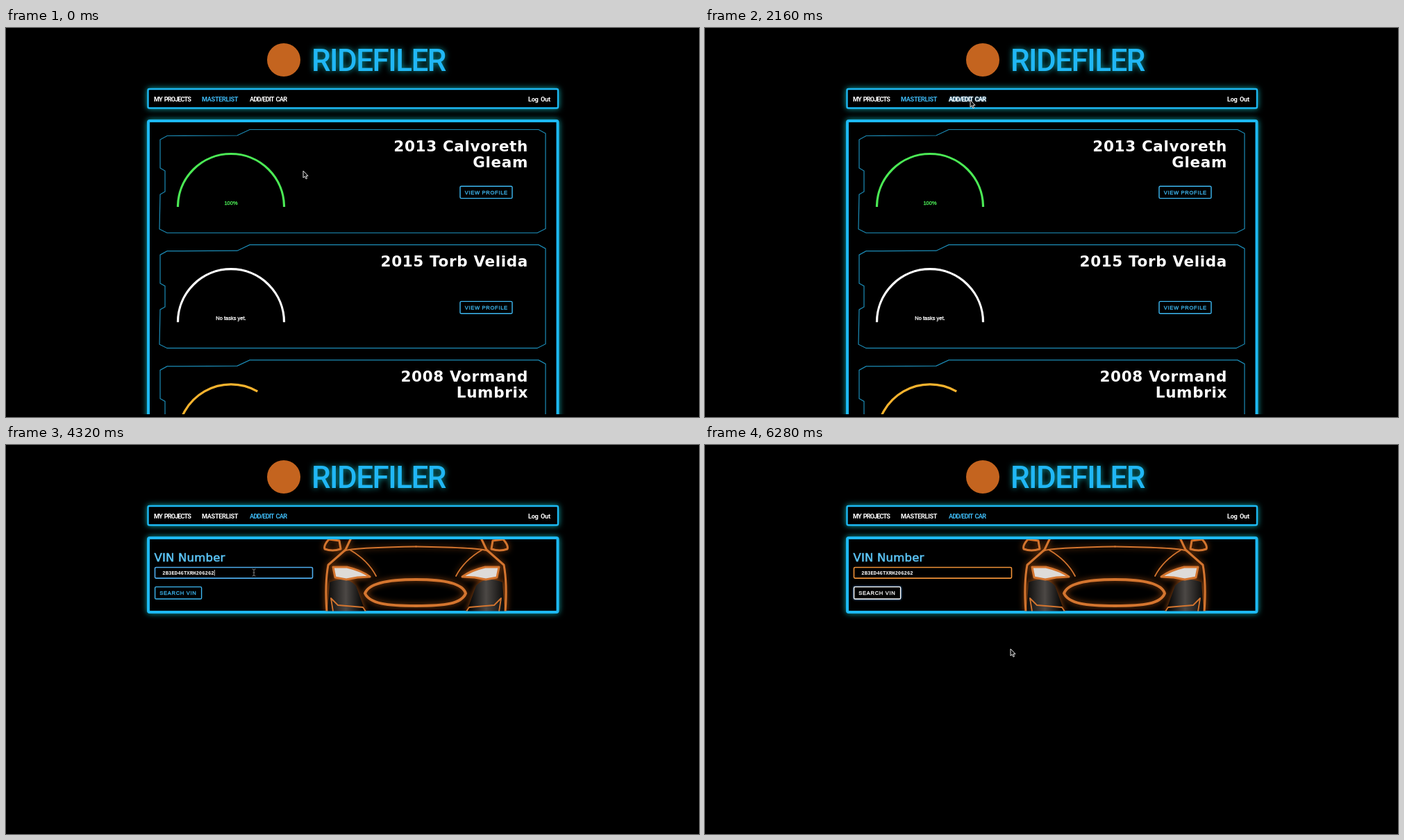
An HTML page for the animation above (8000 ms loop, 998 px wide and 561 px high).

```html
<!DOCTYPE html>
<html lang="en">
<head>
<meta charset="utf-8">
<title>Garage tracker</title>
<style>
html, body { margin: 0; width: 100%; height: 100%; overflow: hidden; background: #000; }
svg { display: block; width: 998px; height: 561px; }
text { white-space: pre; }
.brand { font: 500 44px Roboto, sans-serif; letter-spacing: -1.5px; fill: #20b7f5; filter: drop-shadow(0 0 4px #0c9aa0); }
.nav { font: 700 9.2px Roboto, sans-serif; word-spacing: 1.8px; fill: #fff; }
.title { font: 700 21.5px "DejaVu Sans", sans-serif; letter-spacing: .65px; fill: #fff; text-anchor: end; }
.label { font: 16.5px "DejaVu Sans", sans-serif; letter-spacing: .2px; fill: #5bc4f5; stroke: #5bc4f5; stroke-width: .6; }
.btn { font: 7.6px "Liberation Sans", Arial, sans-serif; letter-spacing: .68px; stroke-width: .3; }
.small { font: 7.5px "Liberation Sans", Arial, sans-serif; text-anchor: middle; stroke-width: .3; }
.vin { font: 700 7.3px "Liberation Mono", monospace; fill: #fff; }
.frame { fill: #000; stroke: #1db9f4; filter: drop-shadow(0 0 4.5px #0fa3a6); }
.line { fill: none; stroke: #d4752f; stroke-linejoin: round; stroke-linecap: round; }
</style>
</head>
<body>
<svg id="stage" viewBox="0 0 998 561" xmlns="http://www.w3.org/2000/svg"></svg>
<script>
const LOOP = 8000, STEP = 40;
const BLUE = '#3db8f2', WHITE = '#ffffff';
const VIN = '2B3ED46TXRH206262';

const text = (cls, x, y, str, extra = '') =>
  `<text class="${cls}" x="${x}" y="${y}" ${extra}>${str}</text>`;

const ink = color => `fill="${color}" stroke="${color}"`;

const nav = (id, x, str, gap) =>
  text('nav', x, 105.8, str, `id="${id}" letter-spacing="${gap}"`);

const button = (id, x, y, w, str) => `<g id="${id}">
  <rect x="${x}" y="${y}" width="${w}" height="17.4" rx="1.6" fill="#000" stroke="${BLUE}" stroke-width="1.4"/>
  ${text('btn', x + 6.7, y + 11.4, str, ink(BLUE))}</g>`;

// Half-circle gauge filled from the left by share (0..1)
function gauge(share, color, label) {
  const a = Math.PI * (1 - share);
  const x = 324 + 76.5 * Math.cos(a), y = 258 - 76.5 * Math.sin(a);
  return `<path d="M247.5 258A76.5 76.5 0 0 1 ${x} ${y}" fill="none" stroke="${color}" stroke-width="3.2"/>
    ${text('small', 324, 255, label, ink(color))}`;
}

function card(i, lines, share, color, label) {
  return `<g transform="translate(0 ${i * 166.2})">
    <path d="M351 146.5H767L777 152V289.5L765 295.5H232L221 290L222 240L229 236V206L222 202V161L232 155.5L333 155Z"
      fill="none" stroke="#1c8db8" stroke-width="1.2"/>
    ${gauge(share, color, label)}
    ${lines.map((s, n) => text('title', 752, 178 + n * 22.5, s)).join('')}
    ${button('view' + i, 654, 228.2, 75, 'VIEW PROFILE')}</g>`;
}

const carHalf = `
  <path d="M466 198Q490 188 504 203L516 236V240H463Z" fill="url(#chrome)"/>
  <g class="line" stroke-width="3">
    <path d="M497 134L489 151L464 173Q459 200 462 240"/>
    <path d="M480 138L465 136Q457 145 459 150Q470 154 482 150Z"/>
    <path d="M471 176L491 176Q512 181 524 190L506 191L490 194L474 191Z" fill="#dedbd8"/>
  </g>
  <g class="line" stroke-width="1.8">
    <path d="M487 153Q494 148 591 146.5M495 151Q521 166 533 189"/>
    <path d="M518 240L514 234L478 231L468 221L471 240"/>
  </g>`;

const car = `<g clip-path="url(#formClip)"><g style="filter:drop-shadow(0 0 4px #a04d12)">
  <g id="half">${carHalf}</g>
  <use href="#half" transform="translate(1181 0) scale(-1 1)"/>
  <path class="line" stroke-width="4" d="M517 214C522 200 548 194 590.5 194S658 200 662 214C656 229 632 232 590.5 232S524 229 517 214Z"/>
</g></g>`;

const stage = document.getElementById('stage');
stage.innerHTML = `
  <defs>
    <clipPath id="view"><rect width="998" height="557"/></clipPath>
    <clipPath id="formClip"><rect x="207" y="136" width="585" height="103.5"/></clipPath>
    <linearGradient id="chrome" x1="0" x2="1">
      <stop stop-color="#0c0b0a"/><stop offset=".5" stop-color="#4c4845"/><stop offset="1" stop-color="#000"/>
    </linearGradient>
  </defs>
  <rect width="998" height="561"/>
  <circle cx="400" cy="46" r="24" fill="#c4641f"/>
  ${text('brand', 440, 62, 'RIDEFILER')}
  <rect class="frame" x="204.5" y="88" width="590.5" height="27.5" rx="2" stroke-width="2.4"/>
  ${nav('projects', 213, 'MY PROJECTS', -.95)}
  ${nav('list', 282, 'MASTERLIST', -.35)}
  ${nav('edit', 351, 'ADD/EDIT CAR', -.8)}
  ${nav('logout', 752, 'Log Out', -.35)}
  <g id="cards" clip-path="url(#view)">
    <rect class="frame" x="205" y="134" width="589.5" height="460" rx="2" stroke-width="4"/>
    ${card(0, ['2013 Calvoreth', 'Gleam'], 1, '#4bea55', '100%')}
    ${card(1, ['2015 Torb Velida'], 1, '#ffffff', 'No tasks yet.')}
    ${card(2, ['2008 Vormand', 'Lumbrix'], 2 / 3, '#f6b32e', '67%')}
  </g>
  <g id="form">
    <rect class="frame" x="205" y="134" width="589.5" height="107" rx="2" stroke-width="4"/>
    ${car}
    ${text('label', 213.5, 167.5, 'VIN Number')}
    <rect id="field" x="214.5" y="176.5" width="227" height="15.6" rx="1.6" fill="#000" stroke-width="1.6"/>
    ${text('vin', 225.3, 187, '', 'id="vin"')}
    <rect id="caret" y="180" width=".9" height="8.6" fill="#ddd"/>
    ${button('search', 214.6, 204.6, 67, 'SEARCH VIN')}
  </g>
  <g id="pointer">
    <path id="arrow" d="M0 0V10L2.3 8L4 11.6L5.6 10.8L4 7.3H7Z" fill="#111" stroke="#e4e4e4" stroke-width="1"/>
    <path id="beam" d="M-2.5 -5Q0 -5 0 -3.5Q0 -5 2.5 -5M0 -4V4M-2.5 5Q0 5 0 3.5Q0 5 2.5 5M-1.5 0H1.5" fill="none" stroke="#777" stroke-width="1"/>
    <path id="hand" d="M-2 -1Q-1 -2 0 0L1 2L2 1L3.5 2L5 2.2L6.5 4V8L5 11H0L-3 6Q-3 5 -1.5 5.6L0 6Z" fill="#eee" stroke="#222" stroke-width=".7"/>
  </g>`;

const el = Object.fromEntries([...stage.querySelectorAll('[id]')].map(n => [n.id, n]));
const show = (node, on) => node.setAttribute('visibility', on ? 'visible' : 'hidden');
const ramp = (t, a, b) => Math.min(1, Math.max(0, (t - a) / (b - a)));
const mix = (a, b, k) => `rgb(${a.map((v, i) => Math.round(v + (b[i] - v) * k))})`;

// Pointer stops: time, x, y
const stops = [
  [600, 428, 206], [960, 330, 134], [1120, 324, 117], [1400, 366, 109], [1440, 366, 109],
  [1680, 382, 104], [2560, 382, 104], [2800, 357, 184], [4680, 357, 184],
  [5320, 270, 211], [5880, 270, 211], [6280, 440, 294]
];

function pointerAt(t) {
  let i = stops.findIndex(s => s[0] > t);
  if (i < 0) return stops.at(-1).slice(1);
  if (i === 0) return stops[0].slice(1);
  const [t0, x0, y0] = stops[i - 1], [t1, x1, y1] = stops[i];
  const k = ramp(t, t0, t1);
  return [x0 + (x1 - x0) * k, y0 + (y1 - y0) * k];
}

function draw(t) {
  const onForm = t >= 2280;
  show(el.cards, !onForm);
  show(el.form, onForm);
  el.list.style.fill = onForm ? WHITE : BLUE;
  el.edit.style.fill = onForm ? BLUE : WHITE;

  const [x, y] = pointerAt(t);
  const within = (x0, y0, x1, y1) => x > x0 && x < x1 && y > y0 && y < y1;
  const overField = onForm && within(214, 176, 442, 193);
  const overButton = onForm && within(214, 204, 282, 223);
  el.pointer.setAttribute('transform', `translate(${x} ${y})`);
  show(el.beam, overField);
  show(el.hand, overButton);
  show(el.arrow, !overField && !overButton);

  const glow = onForm ? 0 : ramp(t, 1440, 1680);
  el.edit.style.filter = glow ? `drop-shadow(0 0 ${glow}px #4fb4ea)` : 'none';

  // The field is orange at rest and blue while focused
  const focus = ramp(t, 3300, 3560) - ramp(t, 5480, 5720);
  el.field.setAttribute('stroke', mix([240, 146, 56], [78, 172, 236], focus));
  const typed = t >= 4320 ? VIN : '';
  if (el.vin.textContent !== typed) el.vin.textContent = typed;
  el.caret.setAttribute('x', typed ? 299.8 : 225);
  const blink = t < 3800 || (t >= 4320 && t < 4840) || t >= 5320;
  show(el.caret, t >= 3320 && t < 5480 && blink);

  const pressed = t >= 5480;
  const color = overButton || pressed ? WHITE : BLUE;
  const [box, label] = el.search.children;
  box.setAttribute('stroke', color);
  label.setAttribute('fill', color);
  label.setAttribute('stroke', color);
  box.style.filter = pressed ? 'drop-shadow(0 0 1.5px #4a9bea)' : 'none';
}

const start = performance.now();
function tick() {
  const t = (performance.now() - start) % LOOP;
  draw(Math.floor(t / STEP) * STEP);
  requestAnimationFrame(tick);
}
tick();
</script>
</body>
</html>
```
